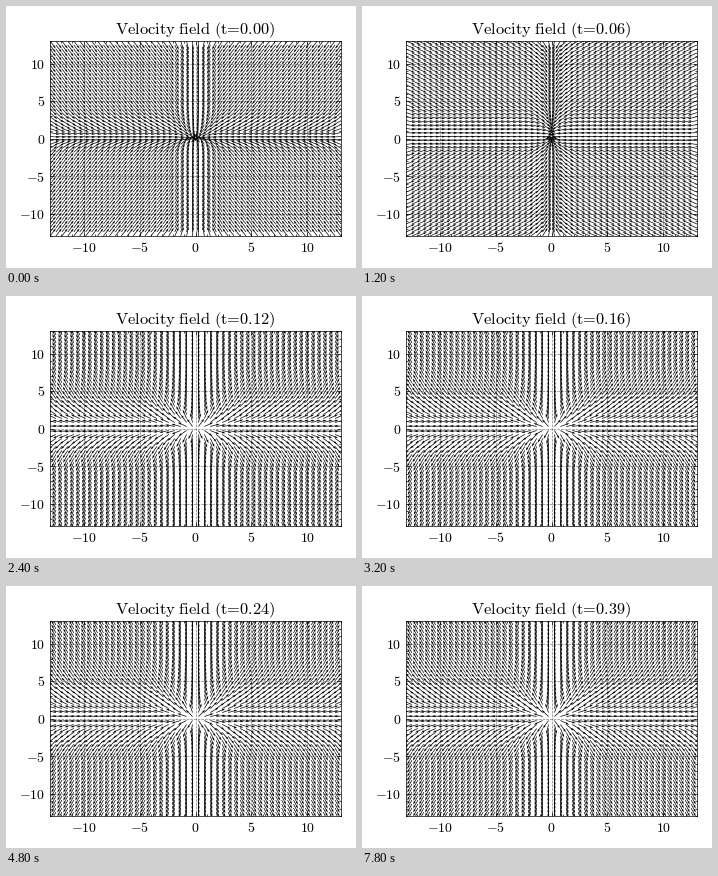
These frames come from a looping animation (350x262 px, 8 s). A matplotlib script:

```python
import numpy as np
import matplotlib.pyplot as plt
from matplotlib.animation import FuncAnimation
from matplotlib.ticker import FuncFormatter, MultipleLocator

W, H, DPI = 350, 262, 100
FRAMES, INTERVAL = 40, 200
LIM, N = 13, 50

plt.rcParams.update({"mathtext.fontset": "cm", "axes.linewidth": 0.5})

axis = np.linspace(-LIM, LIM, N)
X, Y = np.meshgrid(axis, axis)


def ramp(s, low, high):
    """Linear through zero, saturating at -low and high."""
    return np.clip(np.where(s < 0, s / low, s / high), -1, 1)


def field(t):
    # Both components start inward and turn outward, the vertical one first.
    # The saturation limits move out once the component points outward.
    a = 9 * t - 0.77
    b = 15 * t - 1
    u = a * (ramp(X, 4, 4) if a > 0 else ramp(X, 3, 3))
    v = b * (ramp(Y, 5, 7.5) if b > 0 else ramp(Y, 2.6, 5))
    size = np.hypot(u, v)
    return u / size, v / size


def heading(t):
    gap = r"\hspace{-0.2}"
    return r"$\mathrm{Velocity\ field\ (t%s=%s%.2f)}$" % (gap, gap, t)


fig = plt.figure(figsize=(W / DPI, H / DPI), dpi=DPI, facecolor="white")
ax = fig.add_axes([44 / W, 32 / H, 291 / W, 195 / H])
ax.set_xlim(-LIM, LIM)
ax.set_ylim(-LIM, LIM)
for side in (ax.xaxis, ax.yaxis):
    side.set_major_locator(MultipleLocator(5))
    side.set_minor_locator(MultipleLocator(1))
    side.set_major_formatter(FuncFormatter(lambda s, _: f"${s:.0f}$"))
ax.tick_params(which="both", direction="in", top=True, right=True,
               width=0.5, length=1.5)
ax.tick_params(length=3, labelsize=10)
ax.grid(color="k", alpha=0.5, linestyle="--", linewidth=0.5)

arrows = ax.quiver(X, Y, *field(0), scale=30, scale_units="width",
                   width=0.0024, color="k")
title = ax.set_title(heading(0), fontsize=11.8, pad=5.3)


def update(i):
    t = i / 100
    arrows.set_UVC(*field(t))
    title.set_text(heading(t))
    return arrows, title


anim = FuncAnimation(fig, update, frames=FRAMES, interval=INTERVAL,
                     repeat=True, repeat_delay=0, blit=False)
plt.show()
```
